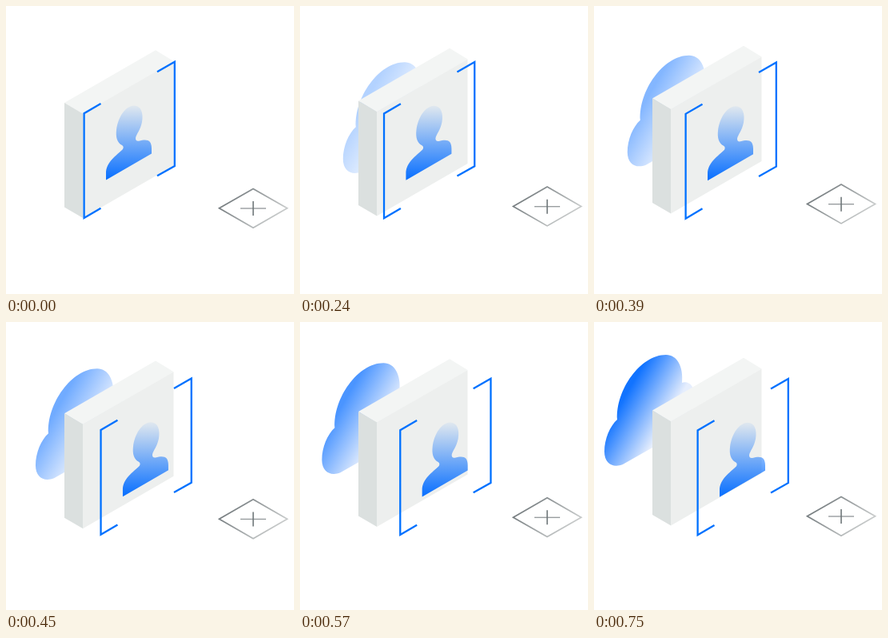
Recreate the animation shown at these times as an HTML page. Size 360 px wide and 360 px high, loop 1500 ms.

```html
<!DOCTYPE html>
<html>
<head>
<meta charset="utf-8">
<style>
  html, body { margin: 0; width: 100%; height: 100%; overflow: hidden; background: #fff; }
  svg { display: block; width: 100%; height: 100%; }
</style>
</head>
<body>
<svg viewBox="0 0 360 360">
  <defs>
    <linearGradient id="cloudFill" gradientUnits="userSpaceOnUse" x1="30" y1="108" x2="82" y2="138">
      <stop stop-color="#1173ff"/>
      <stop offset="1" stop-color="#e6eefd"/>
    </linearGradient>
    <linearGradient id="userFill" gradientUnits="userSpaceOnUse" x1="0" y1="124" x2="0" y2="216">
      <stop stop-color="#0a70ff" stop-opacity=".05"/>
      <stop offset="1" stop-color="#0a70ff"/>
    </linearGradient>
    <linearGradient id="tileStroke" gradientUnits="userSpaceOnUse" x1="285" y1="232" x2="328" y2="274">
      <stop stop-color="#757c7f"/>
      <stop offset="1" stop-color="#c6c9c9"/>
    </linearGradient>
  </defs>

  <path id="cloud" fill="url(#cloudFill)" d="M29 122C27 85 58 41 90 41C104 41 112 56 110 76C118 73 126 80 125 92L120 130L73 157L36 178C24 183 13 177 13 162C13 146 20 130 29 122Z"/>

  <g id="block">
    <path fill="#f3f5f4" d="M73 121L187 55.3L209.5 69L96 135Z"/>
    <path fill="#dbe0df" d="M73 121L96.2 134.7V265L73 251.5Z"/>
    <path fill="#edefee" d="M96 134.7L209.5 69V199.5L96 265Z"/>
  </g>

  <g id="front">
    <path fill="url(#userFill)" d="M125 217.5V209C125 195 138 187 146 179C147 177 147 175 145 174C139 171 137 164 138 155C140 139 149 125 160 124.5C169 124.5 172 134 170 145C168 155 163 160 162 165C162 168 163 169 166 168.7C176 166 182 167 182 178V184.5Z"/>
    <path fill="none" stroke="#0071ff" stroke-width="2.3" d="M118.5 122L97.6 134.2V265L118.5 252.7M189 82.3L210.8 69.8V200L189 212.3"/>
  </g>

  <g id="tile" fill="none">
    <path stroke="url(#tileStroke)" stroke-width="1.7" d="M309 228.4L351.5 252.8L309 277.2L266.5 252.8Z"/>
    <path stroke="#989d9f" stroke-width="1.4" d="M293 253H325"/>
    <path stroke="#6f7679" stroke-width="1.6" d="M309 244V262"/>
  </g>
</svg>
<script>
  const LOOP = 1500, MOVE = 750, STEP = 30;
  const part = id => document.getElementById(id);
  const cloud = part('cloud'), block = part('block'), front = part('front'), tile = part('tile');
  const shift = (el, x, y) => el.setAttribute('transform', `translate(${x} ${y})`);

  function draw(now) {
    const t = Math.floor(now % LOOP / STEP) * STEP;
    const p = Math.min(t / MOVE, 1);
    const ease = (1 - Math.cos(Math.PI * p)) / 2;
    // The cloud drifts and fades linearly; everything else eases.
    shift(cloud, 60 * (1 - p), 43 * (1 - p));
    cloud.setAttribute('opacity', p);
    shift(block, 0, -10.5 * ease);
    shift(front, 32 * ease, 1.2 * ease);
    shift(tile, 0, -10 * ease);
  }

  let start;
  function tick(now) {
    start ??= now;
    draw(now - start);
    requestAnimationFrame(tick);
  }
  draw(0);
  requestAnimationFrame(tick);
</script>
</body>
</html>
```
